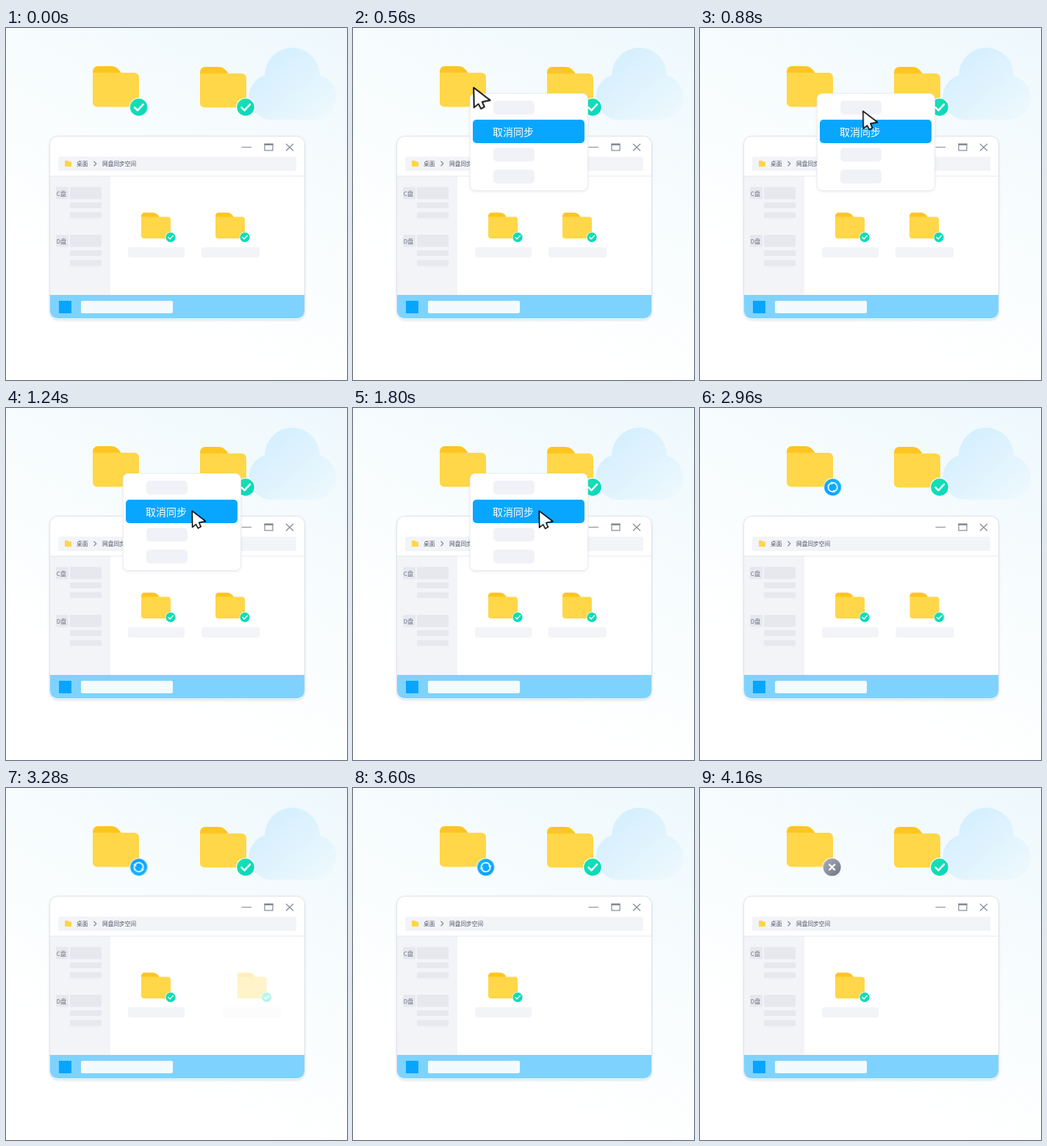
An HTML page without scripts that plays this animation: 464x480 px, repeating every 5 s.

```html
<!DOCTYPE html>
<html lang="zh">
<head>
<meta charset="utf-8">
<title>取消同步</title>
<style>
html, body { margin: 0; width: 100%; height: 100%; overflow: hidden; }
body { background: linear-gradient(207deg, #eef8fc, #f9fdfe 45%, #fff 75%); }
svg { display: block; width: 464px; height: 480px; }
text { font-family: "Noto Sans CJK SC", "Noto Sans CJK", "Noto Sans", sans-serif; font-weight: 500; }
.path { font-size: 7.7px; fill: #4b5263; }
.disk { font-size: 8px; fill: #6a7080; }
.pale { fill: #f3f4f8; }
.bar { fill: #e7e8ee; }
.line { fill: none; stroke: #858a96; stroke-width: 1.2; }
.mark { fill: none; stroke: #fff; stroke-linecap: round; stroke-linejoin: round; }
.anim { animation: 5s linear infinite both; }

.cursor { animation-name: cursor; }
.menu { animation-name: menu; }
.done { animation-name: done; }
.sync { animation-name: sync; }
.spin { animation-name: spin; }
.off { animation-name: off; }
.leave { animation-name: leave; }

@keyframes cursor {
  0%, 3.6% { transform: translate(150.6px, 77.8px) scale(1.25); opacity: 0; animation-timing-function: ease-in; }
  6% { opacity: 1; }
  11.2% { transform: translate(164px, 81.2px) scale(1.22); }
  14.4% { transform: translate(190px, 86px) scale(1.13); animation-timing-function: cubic-bezier(.3, .45, .5, 1); }
  24.8%, 25.6% { transform: translate(253.2px, 140.3px); animation-timing-function: ease-in-out; }
  30% { transform: translate(253.2px, 140.3px) scale(.84); animation-timing-function: ease-in-out; }
  34.4% { transform: translate(253.2px, 140.3px) scale(1.05); }
  36.8% { transform: translate(253.2px, 140.3px); opacity: 1; }
  40.8%, 100% { transform: translate(253.2px, 140.3px); opacity: 0; }
}
@keyframes menu {
  0%, 6.4% { opacity: 0; }
  10.4%, 36.8% { opacity: 1; }
  40.8%, 100% { opacity: 0; }
}
@keyframes done {
  0%, 37.2% { transform: scale(1); opacity: 1; }
  42.4% { transform: scale(.3); opacity: .5; }
  44%, 100% { transform: scale(0); opacity: 0; }
}
@keyframes sync {
  0%, 44% { transform: scale(0); opacity: 0; animation-timing-function: ease-out; }
  48.8%, 72.8% { transform: scale(1); opacity: 1; animation-timing-function: ease-in; }
  76.8%, 100% { transform: scale(0); opacity: 0; }
}
@keyframes spin {
  0%, 44% { transform: rotate(-590deg); }
  72% { transform: rotate(0deg); }
  76.8%, 100% { transform: rotate(101deg); }
}
@keyframes off {
  0%, 76% { transform: scale(0); opacity: 0; animation-timing-function: ease-out; }
  81% { transform: scale(1.13); opacity: 1; animation-timing-function: ease-in-out; }
  83.2%, 100% { transform: scale(1); opacity: 1; }
}
@keyframes leave {
  0%, 58.4% { transform: translate(0); opacity: 1; animation-timing-function: ease-in-out; }
  70%, 100% { transform: translate(42px); opacity: 0; }
}
</style>
</head>
<body>
<svg viewBox="0 0 464 480">
  <defs>
    <linearGradient id="sky" x1="0" y1="0" x2="1" y2="1">
      <stop offset=".1" stop-color="#d2eefe"/>
      <stop offset=".9" stop-color="#ecf8fd"/>
    </linearGradient>
    <linearGradient id="green" x1="0" y1="0" x2="1" y2="1">
      <stop stop-color="#19e3ad"/><stop offset="1" stop-color="#06d6c2"/>
    </linearGradient>
    <linearGradient id="blue" x1="0" y1="0" x2="1" y2="1">
      <stop stop-color="#12b8ff"/><stop offset="1" stop-color="#089cff"/>
    </linearGradient>
    <linearGradient id="grey" x1="0" y1="0" x2="1" y2="1">
      <stop stop-color="#adb1be"/><stop offset="1" stop-color="#6c7180"/>
    </linearGradient>
    <filter id="soft" x="-10%" y="-10%" width="120%" height="120%">
      <feDropShadow dx="0" dy="1" stdDeviation="1.5" flood-color="#8a90a8" flood-opacity=".22"/>
    </filter>
    <g id="folder">
      <path fill="#fec522" d="M0 12V7a7 7 0 0 1 7-7H25q5 0 8.500 3T39 10V12z"/>
      <path fill="#ffd748" d="M0 9H57a6 6 0 0 1 6 6V49.500a6 6 0 0 1-6 6H6a6 6 0 0 1-6-6z"/>
    </g>
    <g id="check">
      <circle r="13" fill="#fff"/>
      <circle r="11.800" fill="url(#green)"/>
      <path class="mark" stroke-width="2.500" d="M-5.500.3-1.500 4.300 6-3.800"/>
    </g>
    <g id="file">
      <use href="#folder" transform="translate(184 251.700) scale(.635)"/>
      <use href="#check" transform="translate(224 285.400) scale(.56)"/>
    </g>
    <g id="arc">
      <path class="mark" stroke-width="1.700" d="M-6-.8A6 6 0 0 1 5.400-2.600"/>
      <path fill="#fff" d="M3.200-1.800 7.600-2.800 6.600 1.200z"/>
    </g>
    <g id="drive">
      <rect class="bar" x="68" width="17" height="16.500" rx="1.500"/>
      <rect class="bar" x="87" width="43" height="16.500" rx="1"/>
      <rect class="bar" x="87" y="21" width="43" height="8" rx="1"/>
      <rect class="bar" x="87" y="34.500" width="43" height="8" rx="1"/>
    </g>
  </defs>

  <path fill="url(#sky)" d="M360 125A31 31 0 0 1 352 64.500A37.500 38 0 0 1 427 65A30.500 30.500 0 0 1 420 125z"/>

  <!-- window -->
  <rect x="59.500" y="147.500" width="347" height="250" rx="11" fill="#fff" stroke="#e0e2e8" filter="url(#soft)"/>
  <g class="line">
    <path d="M320.500 162.500H334M381 158l10 9.500M391 158l-10 9.500"/>
    <rect x="352" y="158" width="11" height="9"/>
    <path d="M351.500 159H363.500" stroke-width="2"/>
  </g>
  <rect class="pale" x="71" y="175.500" width="324" height="19.500" rx="2"/>
  <use href="#folder" transform="translate(80 181) scale(.145)"/>
  <text class="path" x="96" y="188">桌面</text>
  <path class="line" stroke-width=".9" d="M119.500 181.800l3.300 3.200-3.300 3.200"/>
  <text class="path" x="131" y="188">网盘同步空间</text>

  <path class="pale" d="M60 202H142V364H60z"/>
  <path stroke="#e6e8ee" d="M60 202H406"/>
  <use href="#drive" y="216.700"/>
  <use href="#drive" y="282"/>
  <text class="disk" x="68.800" y="228.500">C盘</text>
  <text class="disk" x="68.800" y="294">D盘</text>

  <path fill="#7ed3fe" d="M60 364H406V386a10 10 0 0 1-10 10H70a10 10 0 0 1-10-10z"/>
  <rect x="72" y="372" width="17" height="17" fill="#08a5ff"/>
  <rect x="102" y="372" width="125" height="17" rx="2" fill="#f3fbff"/>

  <use href="#file"/>
  <rect class="pale" x="166" y="299" width="77" height="14" rx="3"/>
  <g class="anim leave">
    <use href="#file" x="101"/>
    <rect class="pale" x="266" y="299" width="79" height="14" rx="3"/>
  </g>

  <!-- synced folders -->
  <use href="#folder" x="118" y="52"/>
  <use href="#folder" x="264" y="53"/>
  <use href="#check" x="326" y="108"/>
  <g transform="translate(180.600 108)">
    <g class="anim done"><use href="#check"/></g>
    <g class="anim sync">
      <circle r="12.600" fill="#fff"/>
      <g class="anim spin">
        <circle r="11.500" fill="url(#blue)"/>
        <use href="#arc"/>
        <use href="#arc" transform="rotate(180)"/>
      </g>
    </g>
  </g>
  <g transform="translate(179.600 108)">
    <g class="anim off">
      <circle r="13" fill="#fff"/>
      <circle r="12" fill="url(#grey)"/>
      <path class="mark" stroke-width="2.400" d="M-3.500-3.500 3.500 3.500M3.500-3.500-3.500 3.500"/>
    </g>
  </g>

  <!-- context menu -->
  <g class="anim menu">
    <rect x="159.300" y="89.500" width="160" height="132" rx="7" fill="#fff" stroke="#eeeff4" filter="url(#soft)"/>
    <g fill="#f1f2f8">
      <rect x="191" y="99" width="56" height="19" rx="5"/>
      <rect x="191" y="163.500" width="56" height="18.500" rx="5"/>
      <rect x="191" y="193" width="56" height="19" rx="5"/>
    </g>
    <rect x="163" y="125" width="152" height="32" rx="5" fill="#08a6ff"/>
    <text x="190" y="146.500" font-size="14" fill="#fff">取消同步</text>
  </g>
  <g class="anim cursor">
    <path fill="#fff" stroke="#000" stroke-width="1.500" stroke-linejoin="round" d="M0 0 .4 22.300 5.300 18.300 8.200 23.700 12 21.600 9.500 16 18.500 14.200z"/>
  </g>
</svg>
</body>
</html>
```
